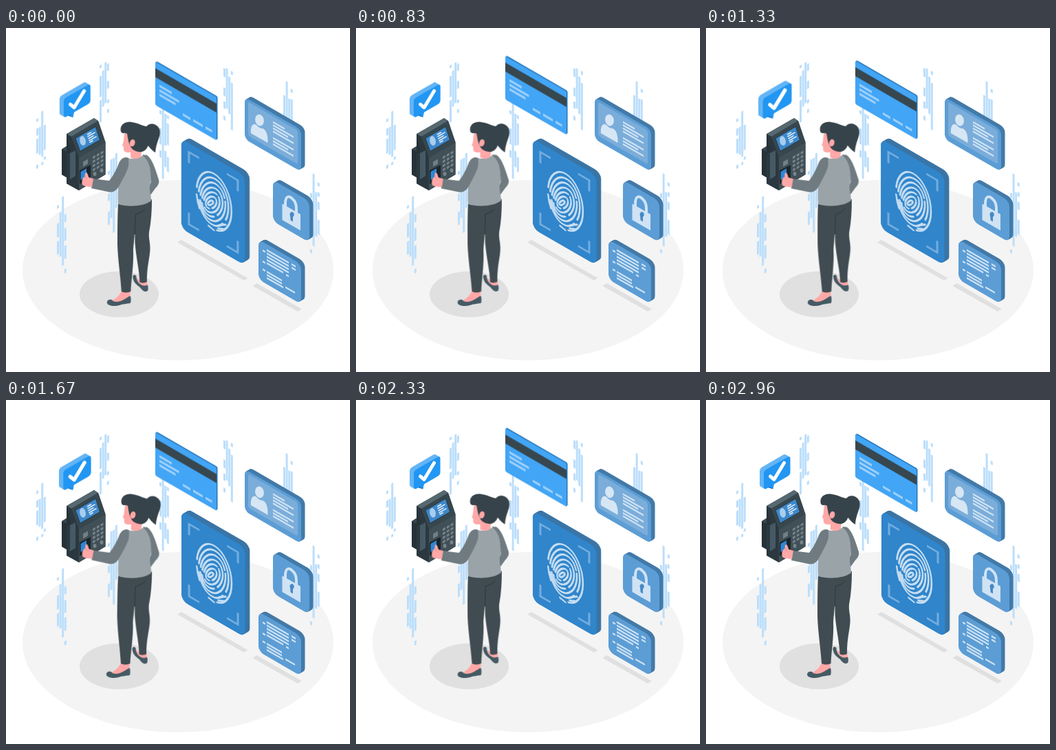
Recreate the animation shown at these times as an HTML page. Size 500 px wide and 500 px high, loop 3 s.

```html
<!DOCTYPE html>
<html lang="en">
<head>
<meta charset="utf-8">
<title>Fingerprint access</title>
<style>
  html, body { margin: 0; height: 100%; overflow: hidden; background: #fff; }
  svg { display: block; width: 100%; height: 100%; }
  .card, .panel, .woman, .bubble { animation: 1.5s linear -30ms infinite; }
  .card { animation-name: float; }
  .panel { animation-name: shake; }
  .woman { animation-name: sway; transform-origin: 167px 270px; }
  .bubble { animation-name: beat; animation-duration: 3s; transform-origin: 100px 104px; }
  @keyframes float { 50% { transform: translateY(-10px); } }
  @keyframes shake {
    10%, 90% { transform: translateX(-1px); }
    20%, 80% { transform: translateX(2px); }
    30%, 50%, 70% { transform: translateX(-4px); }
    40%, 60% { transform: translateX(4px); }
  }
  @keyframes sway {
    25% { transform: rotate(1deg); }
    75% { transform: rotate(-1deg); }
  }
  @keyframes beat {
    0%, 28%, 70%, 100% { transform: scale(1); }
    14%, 42% { transform: scale(1.1); }
  }
</style>
</head>
<body>
<svg viewBox="0 0 500 500">
  <ellipse cx="250" cy="352" rx="226" ry="131" fill="#f4f4f4"/>
  <g fill="#e0e0e0">
    <ellipse cx="164.500" cy="387" rx="57.500" ry="33.500"/>
    <path d="M249 311.500L255 308L351.500 363.500L346 367Z M358.500 375L364.500 371L430 408.500L424 412Z"/>
  </g>
  <g id="streams" fill="#bbdefb"></g>

  <g class="card" id="card"></g>
  <g id="idCard"></g>
  <g id="lockCard"></g>
  <g id="listCard"></g>
  <g class="panel" id="panel"></g>

  <g class="bubble" id="bubble"></g>

  <g id="device">
    <path d="M81 176L89 171L102 178V215L93 220L81 213Z" fill="#37474f"/>
    <path d="M81 176L93 182V220L81 213Z" fill="#263238"/>
    <path d="M88 154L128 131L134 135L144.500 166V213L106 236L88 226Z" fill="#263238"/>
    <path d="M88 154L128 131L134 135L95 158Z" fill="#566870"/>
    <path d="M88 154L95 158L106 188V236L88 226V183L94 180Z" fill="#2b383f"/>
    <path d="M95 158L134 135L144.500 166L106 188Z" fill="#37474f"/>
    <path d="M106 188L144.500 166V213L106 236Z" fill="#414f56"/>
    <path d="M93 182L101 178V215L93 220Z" fill="#455a64"/>
    <path d="M100.500 160L130.500 142.500L137 163L107.500 180Z" fill="#2c3a41"/>
    <path d="M101.500 160.500L130 144L136 162.500L108 178.500Z" fill="#3d88cb"/>
    <ellipse cx="111.500" cy="164" rx="4.300" ry="7" transform="rotate(-12 111.500 164)" fill="#a9cdee"/>
    <path d="M118 155l6-3.500M118.500 158l11-6.300M119.500 161l8-4.600M120.500 164l11-6.300M121.500 166.500l5-3" stroke="#e3f0fb" stroke-width="1.500"/>
    <path d="M112 194.500l7-4v7l-7 4z" fill="#718087"/>
    <path d="M107 207L123 199V218L107 227Z" fill="#1c262b"/>
    <path d="M108.500 209L117 204V216L108.500 221Z" fill="#2f86d3"/>
    <g id="keys" fill="#75848b"></g>
  </g>

  <g class="woman">
    <path d="M203 184C211 187 217 204 222 221C223 225 221 229 217 233L209 244L206 236L211 223L203 206Z" fill="#6f7b80"/>
    <g fill="#ffa8a7">
      <path d="M168 381L181 382L180 394L164 399L153 397C160 393 166 389 168 381Z"/>
      <path d="M194 366L205 366L206 375L198 377L188 362Z"/>
    </g>
    <g fill="#455a64">
      <path d="M147 399C147 395 151 394 154 395C156 399 164 399 171 395C175 393 178 390 181 389.500C182 393 182 397 181 400C175 401 170 401 165 403C158 405 147 404 147 399Z"/>
      <path d="M185 365C183 359 187 357 189.500 360.500C189 367 196 378 206 373.500C207 376 207 380 206 382C202 385 198 381 195 377C190 373 186 370 185 365Z"/>
    </g>
    <path d="M187 255L212 249C212 265 211 282 208 297C207 306 210 312 209.500 322C209 335 205 345 205 369Q200 371.500 194.500 369.500C194 352 189.500 336 187.500 312Z" fill="#404c51"/>
    <path d="M163 254C162 275 162 295 162 315C163 340 166 355 168 383Q174 386 181.500 383C182 366 186 345 185 322C187 300 189 280 188 271Q197 269 202 263L207 254Z" fill="#404c51"/>
    <path d="M188 271Q197 269 202 263M188 271L187.500 300" fill="none" stroke="#2c373c"/>
    <path d="M177 189C184 191 192 190 199 185C206 186 209 196 210 208L211 222C206 232 211 240 211 251C202 259 178 261 163 256C162 240 163 226 166 212C167 200 170 190 177 189Z" fill="#99a3a8"/>
    <path d="M198 184.500C211 182 216 204 222 221L211 223C211 208 209 193 198 184.500Z" fill="#6f7b80"/>
    <g fill="#ffa8a7">
      <path d="M181 176L197 177L196 187C192 191 184 191 181 188Z"/>
      <path d="M173 150C170 160 172 164 169 170C169 172 171 172 171 173C170 178 172 181 177 181C186 181 192 176 194 168L190 148Z"/>
    </g>
    <path d="M167 151C164 141 173 135 183 137C192 138 197 142 204 143C208 137 219 138 223 147C226 158 218 164 217 181C212 178 208 173 205 169L207 168C206 176 200 181 193 180C187 179 182 176 181 172C178 168 177 160 176 154C173 151 170 155 167 151Z" fill="#37434a"/>
    <ellipse cx="183.500" cy="167" rx="3.800" ry="5.300" transform="rotate(15 183.500 167)" fill="#ffa8a7"/>
    <path d="M178 189C172 186 166 190 163 199C159 209 154 217 150 222L126 219L124 233L148 238C156 240 161 236 164 230C170 219 176 209 178 200Z" fill="#6f7b80"/>
    <path d="M127 219L120 217C119 212 117 208 115 211L114.500 216C110 218 110 224 111 228C115 231 121 231 125 231Z" fill="#ffa8a7"/>
    <path d="M115 216L118 220" stroke="#e58a8c"/>
  </g>
</svg>
<script>
  const SLOPE = Math.tan(Math.PI / 6);
  const put = (id, ...parts) => {
    document.getElementById(id).innerHTML += parts.flat().join('');
  };

  // Upright rounded box in isometric view, extruded to the back
  function slab(x, y, w, h, r, depth, face, side) {
    const box = (d, fill) =>
      `<rect width="${w}" height="${h}" rx="${r}" fill="${fill}" transform="translate(${x + d} ${y - d * SLOPE}) skewY(30)"/>`;
    let out = '';
    for (let d = depth; d > 0; d -= 0.5) out += box(d, side);
    return out + box(0, face);
  }

  // Slanted bar with vertical ends
  const bar = (x, y, w, t, k = SLOPE) => `M${x} ${y}l${w} ${w * k}v${t}l${-w} ${-w * k}z`;
  const bars = (list, t, fill) =>
    `<path fill="${fill}" d="${list.map(([x, y, w]) => bar(x, y, w, t)).join('')}"/>`;

  // Data streams: left edge, slant, then four columns of y ranges
  function stream(x, k, ...cols) {
    const d = cols.map((col, i) => col.split(' ').map(range => {
      const [a, b] = range.split('-').map(Number);
      return bar(x + i * 3.6, a - Math.min(k, 0) * 3, 3, b - a - 1.7, k);
    }).join('')).join('');
    return `<path d="${d}"/>`;
  }
  put('streams',
    stream(44, -SLOPE, '131-137 145-157 160-183 198-205', '143-185', '120-188 194-200', '140-178 186-192'),
    stream(136, -SLOPE, '53-59 69-101 104-138', '61-115', '49-110', '51-63 76-89 103-110 117-124'),
    stream(74, -SLOPE, '257-263 283-305 309-330', '267-333', '244-346', '270-283 290-310 315-336 349-357'),
    stream(148, -SLOPE, '207-214 240-252 266-287', '190-277', '188-298', '181-262'),
    stream(223, SLOPE, '119-126 145-170 177-189', '108-220', '124-172 178-203', '126-133 138-171 187-210'),
    stream(316, SLOPE, '58-72 86-100 106-118 127-135', '58-118', '70-126', '62-69 79-149'),
    stream(403, SLOPE, '97-130', '77-140', '102-140', '88-95 103-140'),
    stream(442, SLOPE, '239-248 321-328', '211-318', '238-304', '224-231 238-246 252-265 278-301'));

  const LIGHT = '#cfe3f4';

  put('card',
    slab(217, 49.3, 89, 63, 2, 1.500, '#42a5f5', '#2475b8'),
    `<path d="${bar(217, 58.800, 89, 13)}" fill="#37474f"/>`,
    bars([[223, 82, 18], [223, 88.5, 28.5], [223, 95, 23.5], [257, 123.500, 11], [272, 132, 14], [290, 142.500, 9.500]]
      .map(([x, y, w]) => [x, y + 0.8, w]), 3.500, '#9fd1fb'));

  put('idCard',
    slab(347, 100.5, 82, 61, 7, 5.500, '#5c9dd5', '#437aa8'),
    '<rect width="72" height="49" rx="3" fill="#7badda" transform="translate(352 107.500) skewY(30)"/>',
    `<g fill="#d6e6f4"><ellipse cx="368.500" cy="134" rx="6.300" ry="8.500" transform="rotate(-12 368.500 134)"/>
     <path d="M356 153C355 143 359 137 364 141Q368 146 373 146C378 148 381 155 380.500 167Z"/></g>`,
    bars([[388, 135.500, 17], [388, 140, 30], [388, 144.5, 22], [388, 149, 30], [388, 158.500, 30], [388, 163, 22], [388, 167.500, 30]],
      2.500, LIGHT));

  put('lockCard',
    slab(388, 221, 53, 60, 8, 5.500, '#5c9dd5', '#437aa8'),
    `<path d="M406 262V255C406 243 412 244 416 248Q422 253 422 262V270" fill="none" stroke="${LIGHT}" stroke-width="4"/>
     <path d="${bar(401.500, 255.500, 26.500, 23.500)}" fill="${LIGHT}"/>
     <path d="M413 273a3 3.800 0 1 1 4 1.500v7l-3.300-2z" fill="#4689c5"/>`);

  put('listCard',
    slab(367, 307.500, 62, 58, 8, 5.500, '#5c9dd5', '#437aa8'),
    bars([[373, 322, 4], [379, 321.500, 32], [379, 326.300, 32], [379, 331, 32], [379, 335.800, 32], [379, 340.500, 24],
      [373, 338, 4], [373, 349.500, 4], [379, 353, 22], [379, 357.500, 22], [379, 362, 24],
      [415, 342, 6], [415, 347, 6], [407, 357.500, 4], [406, 375.500, 14]], 2.500, LIGHT));

  // Fingerprint ridges: nested ovals, leaning more towards the core
  function ridges() {
    const gaps = ['60 8 26 6', '72 9 15 4', '34 4 50 12', '66 6 22 6', '40 3 52 5', '58 5 30 7', '70 16 9 5'];
    return gaps.map((dash, k) => {
      const q = 1 - k / 6, rx = 2 + 3.9 * k, ry = 6 + 5.7 * k;
      return `<ellipse rx="${rx}" ry="${ry}" transform="translate(${-5 * q} ${5 * q}) rotate(${38 * q})" pathLength="100" stroke-dasharray="${dash}" stroke-dashoffset="${-35 - k * 3}"/>`;
    }).join('') + '<path d="M-8 40l8 2M6 36l8-4M8 30l9-6"/>';
  }
  put('panel',
    slab(255, 161, 92.500, 130.500, 9, 6.800, '#3085cb', '#3b75a6'),
    `<g transform="translate(255 0) skewY(30)" fill="none" stroke="#74aedf" stroke-width="3">
       <path d="M11 190V174H26M66 174H82V190M11 262V279H26M66 279H82V262"/></g>
     <g transform="translate(302.500 252) skewY(30)" fill="none" stroke="#c6def3" stroke-width="2.500" stroke-linecap="round">${ridges()}</g>`);

  const bubbleBox = (d, fill) =>
    `<rect width="38.500" height="28" rx="4" fill="${fill}" transform="translate(${84 - d} ${103 - d * SLOPE}) skewY(-30)"/>`;
  put('bubble',
    '<path d="M86 126L97 129.500L99 121L90 121Z" fill="#1976d2"/>',
    [6, 5, 4, 3, 2, 1].map(d => bubbleBox(d, '#64b5f6')),
    bubbleBox(0, '#2196f3'),
    '<path d="M91 124L97.500 129.500L99 120Z" fill="#2196f3"/>',
    '<path d="M93.500 111L99 115.500L113.500 91.500" fill="none" stroke="#fff" stroke-width="5" stroke-linecap="round" stroke-linejoin="round"/>');

  let keys = '';
  for (let row = 0; row < 4; row++)
    for (let col = 0; col < 3; col++)
      keys += bar(126 + col * 5.800, 187 + row * 6 - col * 3.300, 3.800, 3.500, -SLOPE);
  put('keys', `<path d="${keys}"/>`,
    '<ellipse cx="129" cy="212" rx="2.500" ry="3"/><ellipse cx="139" cy="207" rx="2.500" ry="3"/>');
</script>
</body>
</html>
```
